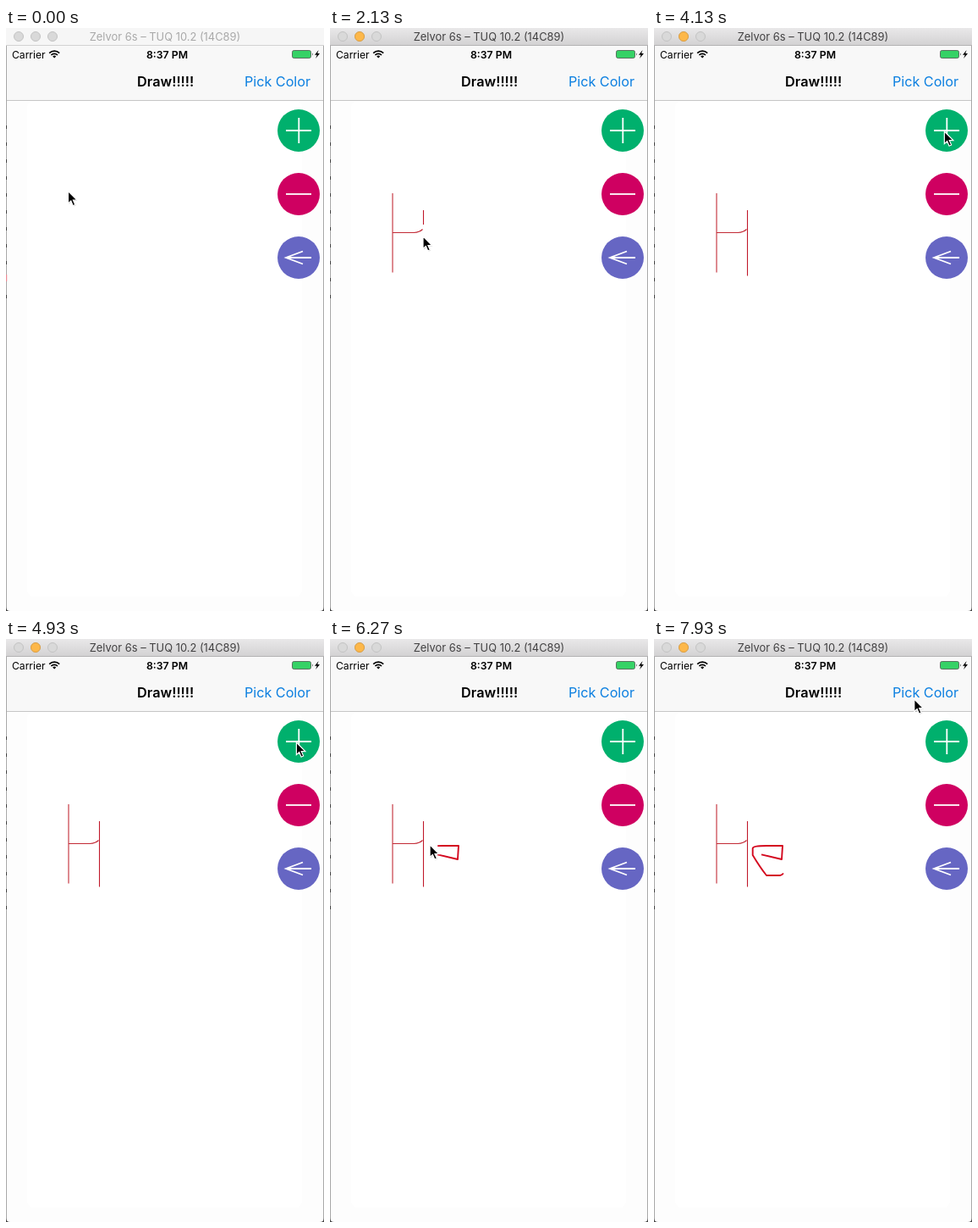
An HTML page for the animation above (8000 ms loop, 376 px wide and 688 px high).

```html
<!DOCTYPE html>
<html lang="en">
<head>
<meta charset="utf-8">
<title>Drawing app</title>
<style>
  html, body { margin: 0; width: 100%; height: 100%; overflow: hidden; background: #fdfdfd; }
  svg { display: block; width: 376px; height: 688px; font-family: Inter, Roboto, sans-serif; }
  .icon { fill: none; stroke: #fff; stroke-width: 1.8; }
  .inactive .on, .active .off { display: none; }
</style>
</head>
<body>
<svg id="stage" class="inactive" viewBox="0 0 376 688">
  <defs>
    <linearGradient id="bar" x2="0" y2="1">
      <stop stop-color="#e9e8e9"/><stop offset="1" stop-color="#d2d1d2"/>
    </linearGradient>
  </defs>

  <rect width="376" height="688" fill="#fdfdfd"/>
  <rect x="25" y="86" width="325" height="585" rx="8" fill="#fff"/>

  <!-- navigation and status bars -->
  <rect y="21" width="376" height="64" fill="#f8f8f8"/>
  <rect y="85" width="376" height="1" fill="#c6c6c6"/>
  <text x="7" y="35.5" font-size="12.1">Carrier</text>
  <g fill="none" stroke="#000" stroke-width="1.7">
    <path d="M51.2 29.6a8.6 8.6 0 0 1 12 0M53.4 32a5.4 5.4 0 0 1 7.6 0"/>
    <path d="M55.2 33.4a2.9 2.9 0 0 1 4 0L57.2 35.6Z" fill="#000" stroke="none"/>
  </g>
  <text x="190.5" y="35.5" font-size="12.3" font-weight="600" text-anchor="middle">8:37 PM</text>
  <rect x="338.5" y="26.5" width="22" height="9" rx="2" fill="#36d266" stroke="#49544c" stroke-width=".8"/>
  <path d="M362 29.3q1.6 1.7 0 3.4Z" fill="#333"/>
  <path d="M369.6 26l-4.6 5.8h2.7l-1.6 4.2 4.9-5.9h-2.8Z"/>
  <text x="188.7" y="69" font-size="16.3" font-weight="600" text-anchor="middle">Draw!!!!!</text>
  <text x="321" y="69" font-size="16.2" fill="#0b7fe0" text-anchor="middle">Pick Color</text>

  <!-- window title bar -->
  <rect class="off" width="376" height="21" fill="#f6f6f6"/>
  <rect class="on" width="376" height="21" fill="url(#bar)"/>
  <rect class="off" y="20" width="376" height="1" fill="#d2d2d2"/>
  <rect class="on" y="20" width="376" height="1" fill="#b3b2b3"/>
  <g fill="#d9d9d9" stroke="#c3c3c3">
    <circle cx="15" cy="10" r="5.5"/>
    <circle cx="35" cy="10" r="5.5"/>
    <circle cx="55" cy="10" r="5.5"/>
    <circle class="on" cx="35" cy="10" r="5.5" fill="#fdb84a" stroke="#dda043"/>
  </g>
  <g font-size="12.9" text-anchor="middle">
    <text class="off" x="188" y="15" fill="#a9a9a9">Zelvor 6s – TUQ 10.2 (14C89)</text>
    <text class="on" x="188" y="15" fill="#424142">Zelvor 6s – TUQ 10.2 (14C89)</text>
  </g>

  <!-- window edges, with slivers of the window behind -->
  <path d="M.5 21V688M375.5 21V688" stroke="#a9a9a9"/>
  <path d="M.5 115V335" stroke="#444" stroke-dasharray="4 16"/>
  <path class="off" d="M0 291h1.2v8H0Z" fill="#f08a96"/>
  <path d="M0 683q0 5 5 5H0ZM376 683q0 5-5 5h5Z" fill="#444"/>

  <g id="buttons"></g>
  <g id="drawing" fill="none" stroke-linejoin="round"></g>
  <g id="cursor">
    <path d="M1 1.5V15.6L4.2 12.6 6.6 18 9.3 16.8 7 11.6H11.3Z" opacity=".18"/>
    <path d="M0 0V14.6L3.3 11.6 5.7 17.2 8.3 16 5.9 10.7H10.5Z" stroke="#fff" stroke-width="1.2"/>
  </g>
</svg>
<script>
const LOOP = 8000, FRAME = 200 / 3;
const ACTIVATE = 190;  // first click brings the window to the front
const PEN_LAG = 80;    // ink trails the pointer
const stage = document.getElementById('stage');
const cursor = document.getElementById('cursor');

function add(parent, tag, attrs) {
  const node = document.createElementNS(stage.namespaceURI, tag);
  for (const key in attrs) node.setAttribute(key, attrs[key]);
  return document.getElementById(parent).appendChild(node);
}

const buttons = [
  ['#00b06d', 'M-15 0H15M.3-15V15'],
  ['#cf0061', 'M-15 0H15'],
  ['#6666c3', 'M15 0H-15M5-7.5L-15 0L5 7.5'],
];
buttons.forEach(([fill, d], i) => {
  const transform = `translate(346 ${121 + 75 * i})`;
  add('buttons', 'circle', { r: 25, fill, transform });
  add('buttons', 'path', { d, class: 'icon', transform });
});

// What the pointer does; gestures without a colour leave no ink
const gesture = (from, to, d, stroke = 'none', width = 1.1) => {
  const node = add('drawing', 'path', { d, stroke, 'stroke-width': width });
  return { from, to, node, length: node.getTotalLength() };
};
const gestures = [
  gesture(270, 800, 'M74 195V288.5', '#c22a36'),
  gesture(1130, 1680, 'M74 241.5H99Q106 241 109.5 237.5', '#c22a36'),
  gesture(1970, 2350, 'M110.5 215V292.5', '#c0182a'),
  gesture(3430, 5270, 'M343.8 124.5h.1'),
  gesture(5600, 6810, 'M127 254.3L151 260L152 244H133Q117 244 116.7 247V255Q125 269 133 279H149Q151 279 153 276.5', '#d4081f', 1.9),
  gesture(7690, LOOP, 'M308.2 73.5h.1'),
];

const clamp = v => Math.min(1, Math.max(0, v));
const easeOut = v => 1 - (1 - v) ** 3;
const progress = ({ from, to }, t) => clamp((t - from) / (to - from));
const pointOn = ({ node, length }, p) => node.getPointAtLength(length * p);

// Follow the current gesture, or travel to reach the next one just in time
function pointerAt(t) {
  const i = gestures.findIndex(g => t < g.to);
  const next = gestures[i], last = gestures[i - 1];
  const b = pointOn(next, progress(next, t));
  if (!last || t >= next.from) return b;
  const a = pointOn(last, 1);
  const distance = Math.hypot(b.x - a.x, b.y - a.y);
  const duration = Math.min(next.from - last.to, 200 + 2.2 * distance);
  const k = easeOut(clamp(1 - (next.from - t) / duration));
  return { x: a.x + (b.x - a.x) * k, y: a.y + (b.y - a.y) * k };
}

function render(now) {
  const t = Math.floor(((now % LOOP) + 5) / FRAME) * FRAME % LOOP;
  stage.setAttribute('class', t < ACTIVATE ? 'inactive' : 'active');
  for (const g of gestures) {
    const drawn = progress(g, t - PEN_LAG);
    g.node.setAttribute('visibility', drawn > 0 ? 'visible' : 'hidden');
    g.node.setAttribute('stroke-dasharray', drawn < 1 ? `${drawn * g.length} 999` : 'none');
  }
  const { x, y } = pointerAt(t);
  cursor.setAttribute('transform', `translate(${x - 0.5} ${y - 2.5})`);
}

let start;
function tick(now) {
  start ??= now;
  render(now - start);
  requestAnimationFrame(tick);
}
render(0);
requestAnimationFrame(tick);
</script>
</body>
</html>
```
